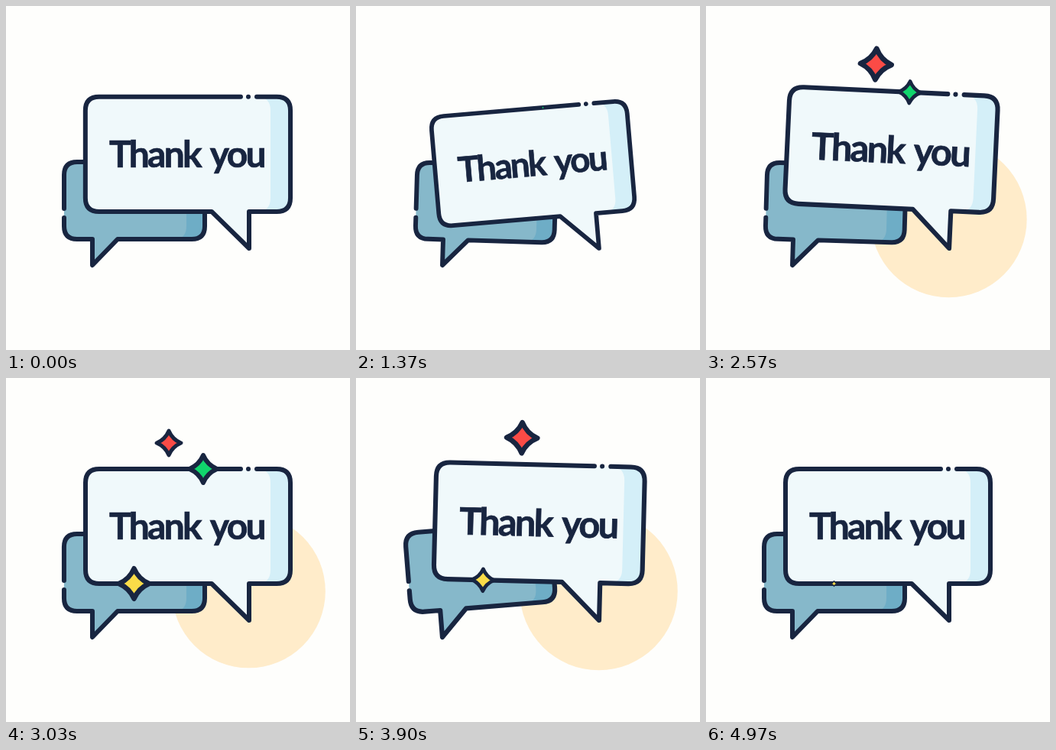
An HTML page for the animation above (5010 ms loop, 450 by 450 pixels).

```html
<!DOCTYPE html>
<html lang="en">
<head>
<meta charset="utf-8">
<title>Thank you</title>
<style>
  html, body { margin: 0; width: 100%; height: 100%; overflow: hidden; background: #fefefc; }
  svg { display: block; width: 100vw; height: 100vh; }
  .line { fill: none; stroke: #182540; stroke-width: 6; stroke-linecap: round; stroke-linejoin: round; }
  .star { stroke: #182540; stroke-width: 6.5; stroke-linejoin: round; }
  text {
    font: 700 48px Lato, "Open Sans", sans-serif; letter-spacing: -2.7px; word-spacing: 5px;
    fill: #182540; stroke: #182540; stroke-width: .7px;
  }
</style>
</head>
<body>
<svg viewBox="0 0 450 450">
  <circle id="sun" cx="317.5" cy="279" fill="#ffecca"/>

  <g id="back">
    <path fill="#86b8ca" d="M93 204H243Q260 204 260 221V288Q260 305 243 305H146L113 339V305H93Q76 305 76 288V221Q76 204 93 204Z"/>
    <path fill="#6eadc6" d="M220 204H243Q260 204 260 221V288Q260 305 243 305H220Q236 305 236 288V221Q236 204 220 204Z"/>
    <path class="line" d="M76 265V221Q76 204 93 204H243Q260 204 260 221V288Q260 305 243 305H146L113 339V305H93Q76 305 76 288V277"/>
  </g>

  <g id="front">
    <path fill="#f0f9fb" d="M122 119H354Q372 119 372 137V251Q372 269 354 269H318V317L269 269H122Q104 269 104 251V137Q104 119 122 119Z"/>
    <path fill="#d4eff8" d="M328 119H354Q372 119 372 137V251Q372 269 354 269H328Q346 269 346 251V137Q346 119 328 119Z"/>
    <path class="line" d="M328 119H354Q372 119 372 137V251Q372 269 354 269H318V317L269 269H122Q104 269 104 251V137Q104 119 122 119H307M317 119h.01"/>
    <text x="236.5" y="211" text-anchor="middle">Thank you</text>
    <g id="stars"></g>
  </g>
</svg>
<script>
const LOOP = 5010;
const byId = id => document.getElementById(id);

// Smooth rise from 0 to 1
function ramp(t, from, to) {
  const u = Math.min(1, Math.max(0, (t - from) / (to - from)));
  return u * u * (3 - 2 * u);
}

// Smooth hill of height 1 around a moment
function bump(t, mid, reach) {
  const u = Math.abs(t - mid) / reach;
  return u < 1 ? Math.cos(u * Math.PI / 2) ** 2 : 0;
}

// Tilts in degrees
const frontTilt = t => 1.3 * bump(t, 500, 500) - 4.9 * bump(t, 1380, 350)
  + 4.7 * bump(t, 2230, 750) + 2.3 * bump(t, 4150, 600);
const backTilt = t => -0.8 * bump(t, 500, 400) + 1.7 * bump(t, 1370, 350)
  - 2.3 * bump(t, 2070, 350) + 1.7 * bump(t, 2580, 400) - 4.6 * bump(t, 3930, 950);

const sunRadius = t => ramp(t, 1610, 1930) * (1 - ramp(t, 4380, 4720))
  * (100 + 5 * Math.cos((t - 2430) / 790 * 2 * Math.PI));

// Pop in, dip, swell, shrink away
function starSize(age) {
  const pop = 1 - (1 - Math.min(1, Math.max(0, age / 333))) ** 2;
  return pop * (1 - 0.3 * bump(age, 1250, 700)) * (1 - ramp(age, 2000, 2330));
}

const stars = [
  { x: 258, y: 119, color: "#10d56c", start: 1357 },
  { x: 213, y: 85, color: "#fb4b46", start: 2040 },
  { x: 167.5, y: 269, color: "#fadc48", start: 2730 }
];
for (const s of stars) {
  s.node = document.createElementNS("http://www.w3.org/2000/svg", "path");
  s.node.setAttribute("d", "M0-20Q6-6 20 0Q6 6 0 20Q-6 6-20 0Q-6-6 0-20Z");
  s.node.setAttribute("class", "star");
  s.node.setAttribute("fill", s.color);
  byId("stars").append(s.node);
}

// Turn and scale a bubble about the tip of its tail
function sway(id, x, y, tilt, scale) {
  byId(id).setAttribute("transform",
    `translate(${x} ${y}) rotate(${tilt}) scale(${scale}) translate(${-x} ${-y})`);
}

function draw(t) {
  sway("front", 317.5, 317.5, frontTilt(t), 1 + 0.0095 * frontTilt(t + 80));
  sway("back", 113, 339, backTilt(t), 1 - 0.007 * backTilt(t));
  byId("sun").setAttribute("r", sunRadius(t));
  for (const s of stars) {
    const size = starSize(t - s.start);
    s.node.style.display = size > 0 ? "" : "none";
    s.node.setAttribute("transform", `translate(${s.x} ${s.y}) scale(${size})`);
  }
}

const began = performance.now();
function tick() {
  draw((performance.now() - began) % LOOP);
  requestAnimationFrame(tick);
}
tick();
</script>
</body>
</html>
```
